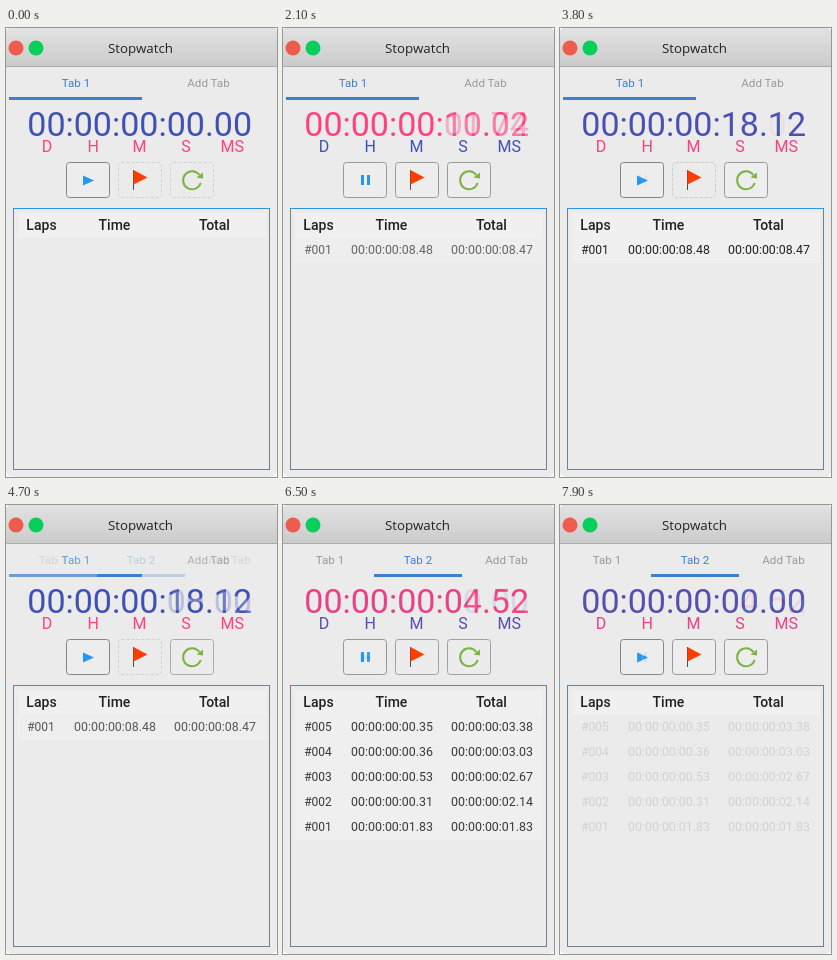
These frames come from a looping animation (271 px wide and 449 px high, 8 s). An HTML page:

```html
<!DOCTYPE html>
<html lang="en">
<head>
<meta charset="utf-8">
<title>Stopwatch</title>
<style>
html, body { margin: 0; width: 100%; height: 100%; overflow: hidden; background: #fff; }
svg { position: absolute; left: 0; top: 0; width: 271px; height: 449px; }
text { font-family: Roboto, sans-serif; text-anchor: middle; white-space: pre; }
.title { font: 13.33px "Open Sans", sans-serif; fill: #222; }
.tab { font-size: 11.6px; fill: #999; }
.tab.on { fill: #3f7fd0; }
.clock { font-size: 34px; }
.unit { font-size: 16px; }
.head { font-size: 14px; font-weight: 500; fill: #212121; }
.cell { font-size: 12px; fill: #212121; }
.time { font-size: 12.4px; }
</style>
</head>
<body>
<script>
const PINK = '#ff4081', INDIGO = '#3f51b5', BLUE = '#2196f3';
const lap1 = [['#001', '08.48', '08.47']];
const laps5 = [
  ['#005', '00.35', '03.38'],
  ['#004', '00.36', '03.03'],
  ['#003', '00.53', '02.67'],
  ['#002', '00.31', '02.14'],
  ['#001', '01.83', '01.83']
];

// flag and reset tell whether those buttons are enabled
const states = [
  { time: '00.00' },
  { time: '01.74', run: true, flag: true, reset: true },
  { time: '10.02', run: true, flag: true, reset: true, laps: lap1 },
  { time: '18.12', reset: true, laps: lap1 },
  { time: '00.00', second: true },
  { time: '04.52', run: true, flag: true, reset: true, laps: laps5, second: true },
  { time: '00.00', flag: true, reset: true, second: true }
];

const text = (x, y, cls, s, fill) =>
  `<text x="${x}" y="${y}" class="${cls}"${fill ? ` style="fill:${fill}"` : ''}>${s}</text>`;
const rect = (x, y, w, h, fill, more = '') =>
  `<rect x="${x}" y="${y}" width="${w}" height="${h}" fill="${fill}" ${more}/>`;
const path = (d, fill, more = '') => `<path d="${d}" fill="${fill}" ${more}/>`;

const button = (x, on, border = '#999') => rect(x + .5, 134.5, 43, 35, on ? '#ededed' : 'none',
  on ? `rx="3" stroke="${border}"` : 'rx="3" stroke="#d0d0d0" stroke-dasharray="3 2"');

function frameOfWindow() {
  return `<defs><linearGradient id="bar" x2="0" y2="1">
      <stop stop-color="#e2e2e2"/><stop offset="1" stop-color="#cbcbcb"/></linearGradient></defs>` +
    path('M0 5Q0 0 5 0H266Q271 0 271 5V441Q271 449 263 449H8Q0 449 0 441Z', '#ebebeb') +
    path('M0 5Q0 0 5 0H266Q271 0 271 5V38H0Z', 'url(#bar)') +
    rect(0, 38, 271, 1, '#acacac') +
    '<circle cx="10" cy="20" r="7.5" fill="#ed5c4c"/><circle cx="30" cy="20" r="7.5" fill="#07cf5a"/>' +
    text(134.5, 25, 'title', 'Stopwatch');
}

function tabs(second) {
  const names = second ? ['Tab 1', 'Tab 2', 'Add Tab'] : ['Tab 1', 'Add Tab'];
  const xs = second ? [47, 135, 223.5] : [70, 202.5];
  const line = second ? [91, 88] : [3, 133];
  return names.map((n, i) => text(xs[i], 59, i === +!!second ? 'tab on' : 'tab', n)).join('') +
    rect(line[0], 69, line[1], 3, '#3f7fcb');
}

function controls({ run, flag, reset }) {
  return button(60, true, run ? '#999' : '#858585') + button(112, flag) + button(164, reset) +
    (run ? rect(78, 147, 3, 10, BLUE) + rect(84, 147, 3, 10, BLUE)
         : path('M77 147.5L88 152.5L77 157.5Z', BLUE)) +
    rect(127, 142, 1, 20, '#5a4a40') + path('M127.5 142L141.5 149.5L127.5 156.5Z', '#ff3d00') +
    path('M194.7 155A9 9 0 1 1 193.4 147', 'none', 'stroke="#7cb342" stroke-width="2"') +
    path('M190.5 149.5L197 150.5L197 144.5Z', '#7cb342');
}

function table(laps = []) {
  const rows = laps.map(([n, time, total], i) => {
    const y = 226 + 25 * i;
    return text(35, y, 'cell', n) + text(109, y, 'cell time', '00:00:00:' + time) +
      text(209, y, 'cell time', '00:00:00:' + total);
  });
  return rect(7.5, 180.5, 256, 261, 'none', 'stroke="#6f8191"') + rect(7, 180, 257, 1, '#2f93ea') +
    rect(12, 185, 248, 25 + 25 * laps.length, '#f0f0f0') +
    text(35.5, 202, 'head', 'Laps') + text(108.5, 202, 'head', 'Time') +
    text(208.5, 202, 'head', 'Total') + rows.join('');
}

function screen(s) {
  const [digits, units] = s.run ? [PINK, INDIGO] : [INDIGO, PINK];
  return frameOfWindow() + tabs(s.second) +
    text(133.7, 108, 'clock', '00:00:00:' + s.time, digits) +
    ['D', 'H', 'M', 'S', 'MS'].map((u, i) => text(41 + 46.3 * i, 124, 'unit', u, units)).join('') +
    controls(s) + table(s.laps);
}

document.body.innerHTML = states.map(s => `<svg viewBox="0 0 271 449">${screen(s)}</svg>`).join('');
const layers = [...document.querySelectorAll('svg')];

const LOOP = 8000, FIRST = 500, PERIOD = 1400, STEP = 100;

// Each screen fades in over the one below, in ten cubic ease-out steps
function draw() {
  const t = performance.now() % LOOP;
  layers.forEach((layer, i) => {
    if (!i) return;
    const step = Math.floor((t - FIRST - PERIOD * (i - 1)) / STEP) + 1;
    const k = Math.min(10, Math.max(0, step)) / 10;
    layer.style.opacity = 1 - (1 - k) ** 3;
  });
  requestAnimationFrame(draw);
}
draw();
</script>
</body>
</html>
```
